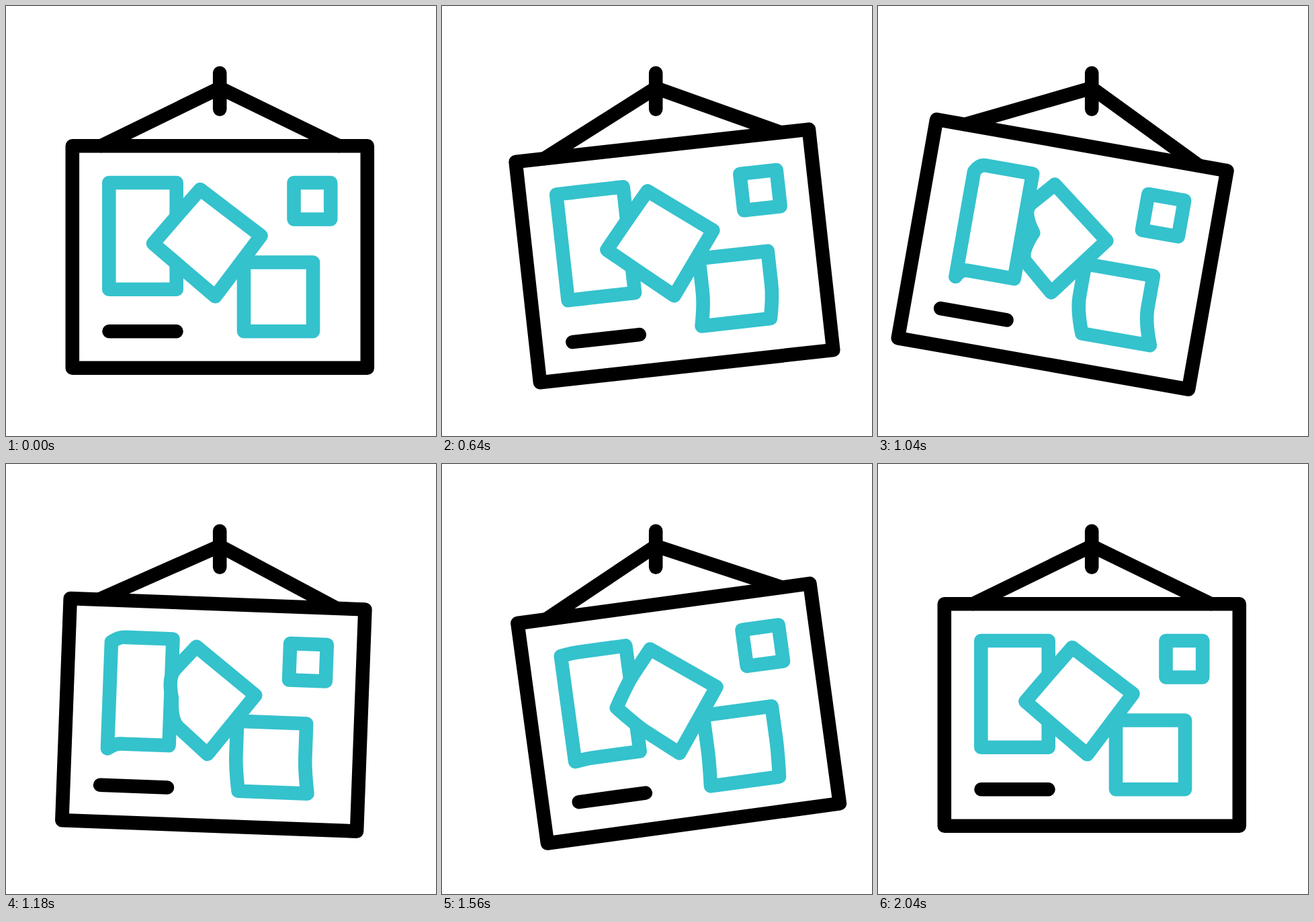
These frames come from a looping animation (640x640 px, 2.72 s). An HTML page:

```html
<!DOCTYPE html>
<html lang="en">
<head>
<meta charset="utf-8">
<title>Swinging board</title>
<style>
  html, body { margin: 0; width: 100%; height: 100%; overflow: hidden; background: #fff; }
  svg { display: block; width: 100%; height: 100%; }
  path { fill: none; stroke: #000; stroke-width: 20.6; stroke-linecap: round; stroke-linejoin: round; }
  .accent { fill: #fff; stroke: #34c2cd; }
</style>
</head>
<body>
<svg viewBox="0 0 640 640">
  <g id="board">
    <path d="M142 208L318.2 122L495 208"/>
    <path d="M98.8 208.3H537.8V538.7H98.8Z"/>
    <path d="M153.5 484.2H253.5"/>
    <path class="accent" d="M428.5 263H483.2V317.5H428.5Z"/>
    <path class="accent" id="panel"/>
    <path class="accent" id="diamond"/>
    <path class="accent" id="card"/>
  </g>
  <path d="M318.2 99.8V153.6"/>
</svg>
<script>
  const LOOP = 2720, STEP = 20, TIP_LAG = 15;
  const [board, panel, diamond, card] =
    ['board', 'panel', 'diamond', 'card'].map(id => document.getElementById(id));

  // Each swing eases every property to its new value and then rests until the next one.
  const rest = { angle: 0, pinch: 0, sway: 0, drop: 0 };
  const swings = [
    { start: 440, end: 612, angle: -6.7, pinch: 0, sway: -7.3, drop: -2.6 },
    { start: 612, end: 922, angle: 10, pinch: 1, sway: 13, drop: 0 },
    { start: 1052, end: 1352, angle: -10.1, pinch: 0.1, sway: -7, drop: 3 },
    { start: 1432, end: 1840, angle: 0, pinch: 0.5, sway: 10.5, drop: 2.2 },
    { start: 1840, end: 2040, ...rest },
  ];

  function ease(x) {
    const t = Math.min(1, Math.max(0, x));
    return t * t * (3 - 2 * t);
  }

  function poseAt(time) {
    const pose = { ...rest };
    for (const swing of swings) {
      const part = ease((time - swing.start) / (swing.end - swing.start));
      for (const name in pose) pose[name] += (swing[name] - pose[name]) * part;
    }
    return pose;
  }

  function draw(time) {
    const { angle, pinch, sway, drop } = poseAt(time);
    board.setAttribute('transform', `rotate(${angle} 318.2 122)`);

    const left = 153.3 + 14 * pinch, sink = 12 * pinch;
    panel.setAttribute('d', `M253.7 263V421.7H183Q173 421.7 ${left} ${421.7 + sink}
      V${263 + sink}Q173 263 183 263Z`);

    // The pushed-in corner of the diamond trails slightly behind.
    const tipPinch = poseAt(time - TIP_LAG).pinch;
    diamond.setAttribute('d', `M289 273L259 307.3Q248 319.9 ${219 + 51 * tipPinch} ${353.5 - 4 * tipPinch}
      Q255 384.2 267 394.5L311.5 432.3L379.5 342Z`);

    const bottom = 484.3 + drop;
    card.setAttribute('d', `M354 381.5H457V431Q457 451 ${457 + sway} ${bottom}
      H${354 + sway}Q354 451 354 431Z`);
  }

  function frame() {
    const time = performance.now() % LOOP;
    draw(time - time % STEP);
    requestAnimationFrame(frame);
  }
  frame();
</script>
</body>
</html>
```
